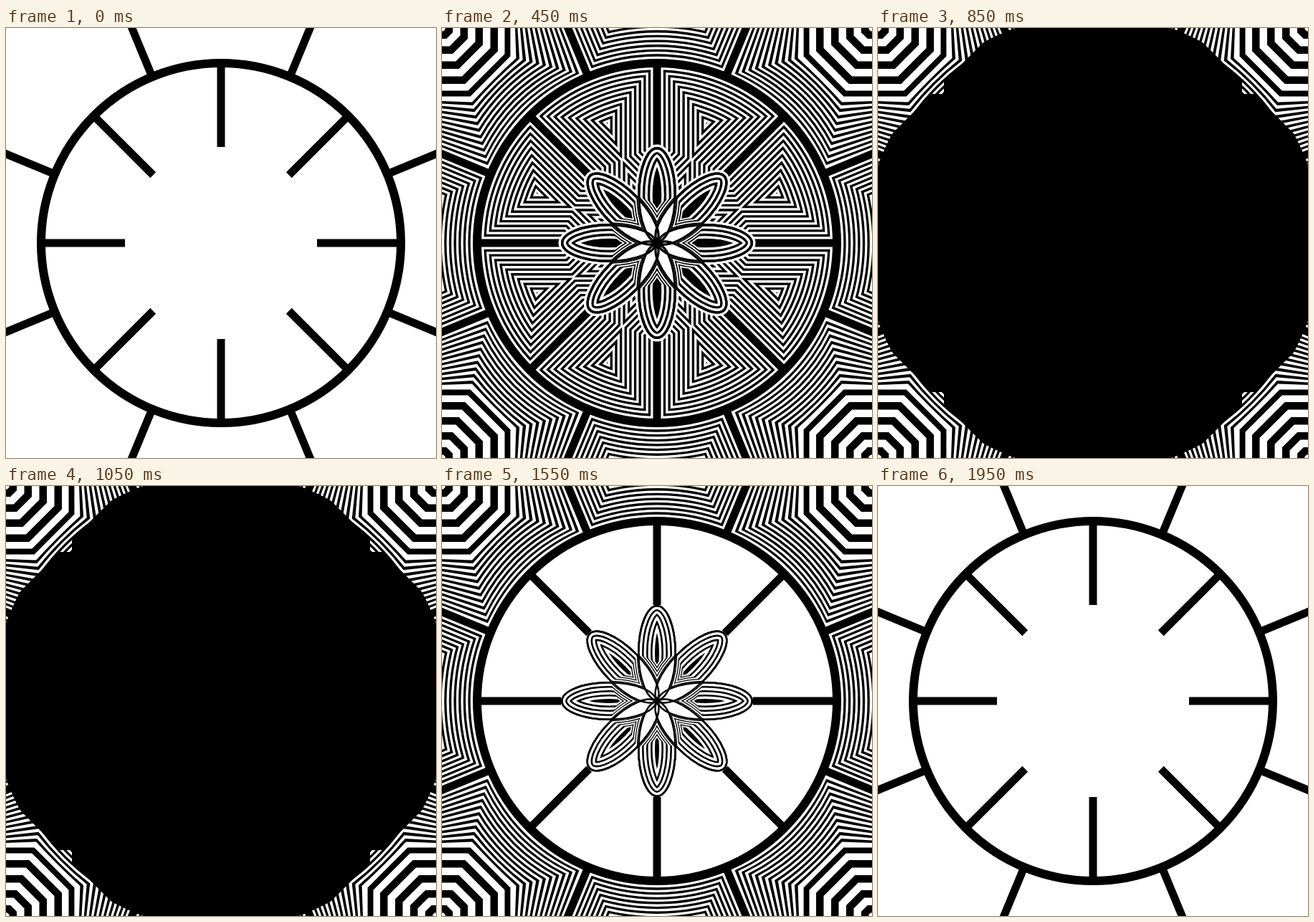
Write an HTML page with a canvas that moves like this. It is 600 px wide and 600 px high and loops after 2100 ms.

```html
<!DOCTYPE html>
<html lang="en">
<head>
<meta charset="utf-8">
<title>Line mandala</title>
<style>
html, body { margin: 0; width: 100%; height: 100%; overflow: hidden; background: #fff; }
canvas { display: block; width: 600px; height: 600px; }
</style>
</head>
<body>
<canvas id="stage" width="600" height="600"></canvas>
<script>
const g = document.getElementById('stage').getContext('2d');
const LOOP = 2100, TAU = Math.PI * 2, K = Math.tan(Math.PI / 8);
const RING = 251, RING_HALF = 6, SPOKE_HALF = 5.5, HUB = 134;
const PITCH = 6.65;
const INK = '#000', PAPER = '#fff';

function scoped(fn) { g.save(); fn(); g.restore(); }

function poly(pts, color) {
  g.beginPath();
  pts.forEach(p => g.lineTo(p[0], p[1]));
  g.closePath();
  g.fillStyle = color;
  g.fill();
}

function disc(r, color) {
  g.beginPath();
  g.arc(0, 0, r, 0, TAU);
  g.fillStyle = color;
  g.fill();
}

// Runs fn eight times, turned by 45 degrees each time
function around(start, fn) {
  for (let i = 0; i < 8; i++) scoped(() => {
    g.rotate(start + i * TAU / 8);
    fn();
  });
}

function ring(d, color) {
  g.beginPath();
  g.arc(0, 0, RING, 0, TAU);
  g.lineWidth = 2 * (RING_HALF + d);
  g.strokeStyle = color;
  g.stroke();
}

// Inner spokes grown by d, with chamfered ends
function innerSpokes(d, color) {
  const h = SPOKE_HALF + d, e = SPOKE_HALF + K * d;
  around(0, () => poly([
    [RING, -h], [HUB - K * d, -h], [HUB - d, -e],
    [HUB - d, e], [HUB - K * d, h], [RING, h]
  ], color));
}

function outerSpokes(d, color) {
  const h = SPOKE_HALF + d;
  around(TAU / 16, () => poly([[RING, -h], [460, -h], [460, h], [RING, h]], color));
}

// Contour lines between the inner spokes; everything deeper than limit is black
function wedges(limit) {
  scoped(() => {
    g.beginPath();
    g.arc(0, 0, RING, 0, TAU);
    g.clip();
    disc(RING, INK);
    for (let i = 21; i > 0; i--) {
      const d = i * PITCH / 2;
      if (d > limit) continue;
      const color = i % 2 ? PAPER : INK;
      ring(d, color);
      innerSpokes(d, color);
    }
  });
}

// Corner contour that meets the stage edge at u: an octagon near the
// corner, turning into the outline of the field between two spokes
function cornerShape(u, color) {
  const t = Math.max(0, (u - 98) / 72);
  const x = t ? 98 + 98 * t : u;
  const y = t ? 98 * K + (65 - 98 * K) * t : u * K;
  const mid = (x + y) / 2 - 25 * t;
  g.beginPath();
  g.moveTo(0, 0);
  g.lineTo(u, 0);
  g.lineTo(x, y);
  g.quadraticCurveTo(mid, mid, y, x);
  g.lineTo(0, u);
  g.closePath();
  g.fillStyle = color;
  g.fill();
}

function eachCorner(fn) {
  for (const sx of [1, -1]) for (const sy of [1, -1]) scoped(() => {
    g.scale(sx, sy);
    g.translate(-300, -300);
    fn();
  });
}

function outerLines() {
  for (let i = 17; i > 0; i--) {
    const color = i % 2 ? PAPER : INK, d = i * PITCH / 2;
    ring(d, color);
    outerSpokes(d, color);
  }
  eachCorner(() => {
    let white = true;
    for (let u = 170; u > 0; white = !white) {
      cornerShape(u, white ? PAPER : INK);
      u -= u > 105 ? 3.4 : Math.min(10.5, 6 + (105 - u) * 0.2);
    }
  });
  disc(RING, PAPER);
}

function petal(turn) {
  g.beginPath();
  g.ellipse(67 * Math.cos(turn), 67 * Math.sin(turn), 67, 27, turn, 0, TAU);
}

function edge(width, color) {
  g.lineWidth = width;
  g.strokeStyle = color;
  g.stroke();
}

// Neighbouring petals press half as deep into the rings as the own outline
function flower(pitch, black, rings, core, halo) {
  const step = TAU / 8;
  if (halo) around(0, () => { petal(0); edge(7, PAPER); });
  around(0, () => {
    petal(0);
    g.clip();
    g.fillStyle = core ? INK : PAPER;
    g.fill();
    for (let i = rings - 1; i >= 0; i--) {
      for (const [d, color] of [[(i + 1) * pitch, PAPER], [i * pitch + black, INK]]) {
        for (const turn of [-step, step, 0]) {
          petal(turn);
          edge(turn ? d : 2 * d, color);
        }
      }
    }
  });
  // Plain overlaps of neighbouring petals
  around(0, () => {
    petal(0);
    g.clip();
    petal(step);
    g.clip();
    g.fillStyle = PAPER;
    g.fill();
  });
  around(0, () => {
    petal(0);
    g.clip();
    edge(2 * black, INK);
  });
}

function frame() {
  ring(0, INK);
  innerSpokes(0, INK);
  outerSpokes(0, INK);
}

// Black disc that leaves the four corners open
function eclipse() {
  eachCorner(() => {
    g.beginPath();
    g.rect(0, 0, 300, 300);
    [[0, 0], [167, 0], [92, 75], [92, 92], [75, 92], [0, 167]]
      .forEach((p, i) => i ? g.lineTo(p[0], p[1]) : g.moveTo(p[0], p[1]));
    g.closePath();
    g.clip('evenodd');
    g.beginPath();
    g.arc(300, 300, 319, 0, TAU);
    g.fillStyle = INK;
    g.fill();
  });
}

function draw(stage) {
  g.setTransform(1, 0, 0, 1, 0, 0);
  g.fillStyle = stage === 10 ? INK : PAPER;
  g.fillRect(0, 0, 600, 600);
  if (stage === 10) return;
  g.translate(300, 300);
  if (stage >= 4) outerLines();
  if (stage >= 5 && stage <= 7) wedges([99, 7.5 * PITCH, 4.5 * PITCH][stage - 5]);
  frame();
  if (stage >= 1 && stage <= 4) flower(6, 2.6, [1, 2, 4, 4][stage - 1], stage > 2, false);
  if (stage >= 5 && stage <= 7) flower(6.9, 3.4, 3, true, true);
  if (stage === 8) disc(RING + RING_HALF, INK);
  if (stage === 9) eclipse();
}

const start = performance.now();
let shown = -1;

function tick() {
  const t = (performance.now() - start) % LOOP;
  const n = Math.min(20, Math.floor((t + 50) / 100));
  const stage = n <= 10 ? n : 20 - n;
  if (stage !== shown) {
    shown = stage;
    draw(stage);
  }
  requestAnimationFrame(tick);
}
tick();
</script>
</body>
</html>
```
